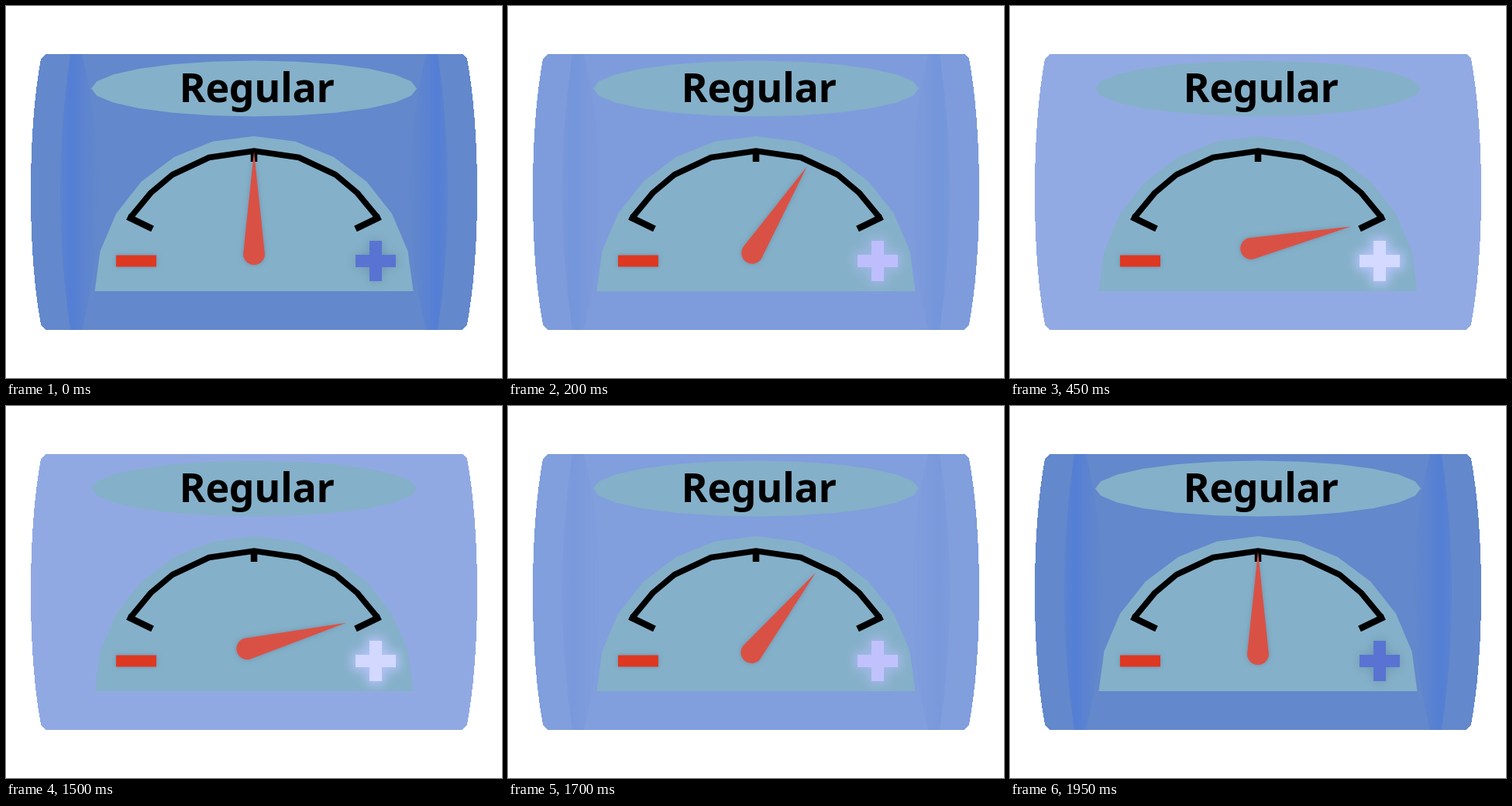
An HTML page that plays this animation: 640 by 480 pixels, repeating every 2000 ms.

```html
<!DOCTYPE html>
<html lang="en">
<head>
<meta charset="utf-8">
<title>Gauge</title>
<style>
  html, body { margin: 0; width: 100%; height: 100%; overflow: hidden; background: #fff; }
  svg { display: block; width: 640px; height: 480px; }
  text { font: bold 52px "Noto Sans", "Open Sans", sans-serif; letter-spacing: -.4px; }
</style>
</head>
<body>
<svg viewBox="0 0 640 480">
  <defs>
    <linearGradient id="shade">
      <stop offset="0" stop-color="#4f7cd8" stop-opacity=".5"/>
      <stop offset=".3" stop-color="#4f7cd8"/>
      <stop offset=".55" stop-color="#4f7cd8" stop-opacity=".55"/>
      <stop offset="1" stop-color="#4f7cd8" stop-opacity="0"/>
    </linearGradient>
    <path id="band" d="M83 62Q57 240 83 418H98Q140 240 98 62Z" fill="url(#shade)"/>
    <path id="cross" d="M469 303h16v18h18v16h-18v18h-16v-18h-18v-16h18Z"/>
    <filter id="soft" x="-80%" y="-80%" width="260%" height="260%">
      <feGaussianBlur stdDeviation="6.5"/>
    </filter>
    <filter id="shadow" x="-40%" y="-80%" width="180%" height="260%">
      <feDropShadow dx="0" dy="0" stdDeviation="3" flood-color="#496f88" flood-opacity=".5"/>
    </filter>
  </defs>

  <path id="body" shape-rendering="crispEdges" d="M51 62H589L595 68Q608 140 608 240T595 411L589 418H51L45 411Q32 340 32 240T45 68Z"/>
  <g id="bands">
    <use href="#band"/>
    <use href="#band" transform="matrix(-1 0 0 1 640 0)"/>
  </g>

  <g fill="#85b0c9">
    <polygon id="plate"/>
    <polygon id="dial"/>
  </g>
  <text x="223.5" y="124">Regular</text>

  <g fill="none" stroke="#000">
    <path stroke-width="7.500" d="M160.500 273L186.500 241.500L215 217.500L262 195.500L320 187L378 195.500L425 217.500L453.500 241.500L479.500 273"/>
    <path stroke-width="8.500" d="M157 272L189 287.500M483 272L451 287.500M320 186V201"/>
  </g>

  <path d="M142 321.500h52v15h-52Z" fill="#dc3922" filter="url(#shadow)"/>
  <use id="dim" href="#cross" fill="#4d7390" filter="url(#soft)"/>
  <use id="glow" href="#cross" fill="#bcc6ff" stroke="#bcc6ff" stroke-width="9" filter="url(#soft)"/>
  <use id="plus" href="#cross"/>

  <g filter="url(#shadow)">
    <path id="needle" d="M320 188L334 320A14 14 0 0 1 306 320Z" fill="#d95145"/>
  </g>
</svg>
<script>
const el = id => document.getElementById(id);
const PERIOD = 2000, STEP = 50, SWING = 77.5;
const LEVELS = [0, 0.21, 0.42, 1];
const BODY = [[99, 136, 204], [112, 147, 215], [126, 156, 220], [146, 170, 227]];
const PLUS = [[89, 115, 210], [163, 170, 240], [190, 190, 253], [211, 217, 255]];

const clamp = x => Math.min(1, Math.max(0, x));
const smooth = x => x * x * (3 - 2 * x);

// Elliptic outline in 15 degree facets
function facets(id, cx, cy, rx, ry, count) {
  const pts = [];
  for (let i = 0; i <= count; i++) {
    const a = Math.PI + i * Math.PI / 12;
    pts.push((cx + rx * Math.cos(a)).toFixed(1) + "," + (cy + ry * Math.sin(a)).toFixed(1));
  }
  el(id).setAttribute("points", pts.join(" "));
}

function blend(colors, v) {
  const i = v < LEVELS[1] ? 0 : v < LEVELS[2] ? 1 : 2;
  const k = (v - LEVELS[i]) / (LEVELS[i + 1] - LEVELS[i]);
  return "rgb(" + colors[i].map((c, n) => Math.round(c + (colors[i + 1][n] - c) * k)) + ")";
}

function draw(ms) {
  const t = Math.floor(ms % PERIOD / STEP) * STEP;
  const v = smooth(clamp(t / 450)) - smooth(clamp((t - 1450) / 500));
  el("needle").setAttribute("transform", `rotate(${v * SWING} 320 311)`);
  el("body").setAttribute("fill", blend(BODY, v));
  el("plus").setAttribute("fill", blend(PLUS, v));
  el("bands").setAttribute("opacity", 0.75 * Math.pow(1 - v, 2.5));
  el("dim").setAttribute("opacity", 0.45 * (1 - v));
  el("glow").setAttribute("opacity", 0.85 * Math.sqrt(v));
}

facets("plate", 320, 106.5, 210, 36, 23);
facets("dial", 320, 368, 205.5, 200, 12);

const start = performance.now();
function loop() {
  draw(performance.now() - start);
  requestAnimationFrame(loop);
}
loop();
</script>
</body>
</html>
```
